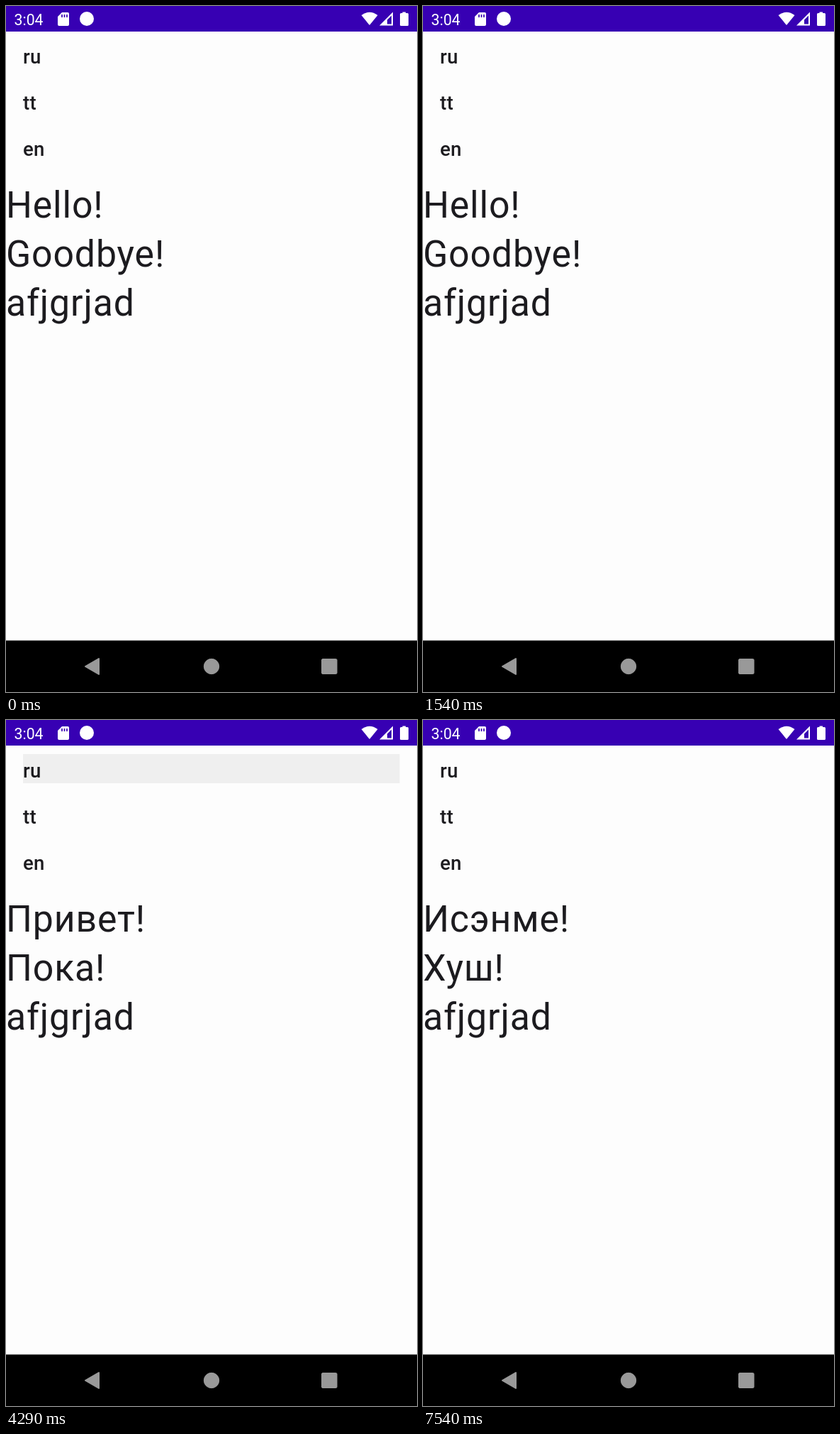
An HTML page that plays this animation: 580x966 px, repeating every 7.58 s.

```html
<!DOCTYPE html>
<html lang="en">
<head>
<meta charset="utf-8">
<style>
  html, body { margin: 0; width: 100%; height: 100%; overflow: hidden; background: #fdfdfd; }
  svg { display: block; font-family: Roboto, sans-serif; }
  .row { font-size: 27.6px; font-weight: 500; letter-spacing: .26px; fill: #1c1b1f; }
  .line { font-size: 51.75px; letter-spacing: .8625px; fill: #1c1b1f; }
</style>
</head>
<body>
<svg width="580" height="966" viewBox="0 0 580 966">
  <defs><clipPath id="bounds"><rect id="bound" x="24" width="531.5" height="41"/></clipPath></defs>
  <rect width="580" height="966" fill="#fdfdfd"/>

  <rect width="580" height="36" fill="#3700b3"/>
  <g fill="#fff">
    <text x="11.5" y="26.5" font-size="21.3">3:04</text>
    <path d="M79 9h8q2 0 2 2v15q0 2-2 2H75q-2 0-2-2V15z"/>
    <path d="M79 12v4M82.5 12v4M86 12v4" stroke="#3700b3" stroke-width="1.7"/>
    <circle cx="114" cy="18" r="10"/>
    <path d="M513 27L501.5 13Q513 4.500 524.500 13z"/>
    <path d="M546 8.500V27.500H527zM544 13.500L538 19.500V25.500H544z" fill-rule="evenodd"/>
    <path d="M559.500 10V8.500h4.500V10h2.500q1.500 0 1.500 1.500V26.500q0 1.500-1.500 1.500h-9q-1.500 0-1.500-1.500V11.500q0-1.500 1.500-1.500z"/>
  </g>

  <text class="row" x="24" y="81">ru</text>
  <text class="row" x="24" y="146">tt</text>
  <text class="row" x="24" y="211">en</text>
  <text class="line" id="greeting" x="0" y="298"></text>
  <text class="line" id="farewell" x="0" y="367"></text>
  <text class="line" x="0" y="436">afjgrjad</text>
  <g clip-path="url(#bounds)"><circle id="ripple"/></g>

  <rect y="893.5" width="580" height="73" fill="#000"/>
  <g fill="#999" stroke="#999" stroke-linejoin="round">
    <path d="M112 930L131 919V941z" stroke-width="2"/>
    <circle cx="290" cy="930" r="10.7"/>
    <rect x="445.500" y="919.500" width="21.500" height="21" rx="1.500"/>
  </g>
</svg>
<script>
const LOOP = 7580, EXPAND = 225, FADE_IN = 75, FADE_OUT = 150, TEXT_DELAY = 100;
const words = {
  en: ['Hello!', 'Goodbye!'],
  tt: ['Исэнме!', 'Хуш!'],
  ru: ['Привет!', 'Пока!']
};
const rowTop = { ru: 48, tt: 113, en: 178 };
const taps = [
  { lang: 'tt', start: 1935, hold: EXPAND },
  { lang: 'ru', start: 3685, hold: 520 },
  { lang: 'en', start: 4935, hold: EXPAND },
  { lang: 'tt', start: 6435, hold: EXPAND }
];
const [greeting, farewell, ripple, bound] =
  ['greeting', 'farewell', 'ripple', 'bound'].map(id => document.getElementById(id));
const clamp = v => Math.min(1, Math.max(0, v));
const mix = (a, b, k) => a + (b - a) * k;

// cubic-bezier(.4, 0, .2, 1)
function ease(x) {
  let lo = 0, hi = 1;
  for (let i = 0; i < 20; i++) {
    const s = (lo + hi) / 2, r = 1 - s;
    if (1.2 * r * r * s + .6 * r * s * s + s ** 3 < x) lo = s; else hi = s;
  }
  return 3 * lo * lo - 2 * lo ** 3;
}

function set(el, attrs) {
  for (const name in attrs) el.setAttribute(name, attrs[name]);
}

function drawRipple({ lang, start, hold }, time) {
  const age = time - start, grow = clamp(age / EXPAND), top = rowTop[lang];
  const alpha = .13 * clamp(age / FADE_IN) * (1 - clamp((age - hold) / FADE_OUT));
  set(bound, { y: top });
  set(ripple, {
    cx: mix(98, 289.5, grow), cy: top + 20.5,
    r: mix(159, 281, ease(grow)), 'fill-opacity': alpha
  });
}

function frame(now) {
  const time = now % LOOP;
  const shown = taps.filter(tap => time >= tap.start + TEXT_DELAY).pop();
  [greeting.textContent, farewell.textContent] = words[shown ? shown.lang : 'en'];
  drawRipple(taps.filter(tap => time >= tap.start).pop() || taps[0], time);
  requestAnimationFrame(frame);
}
frame(0);
</script>
</body>
</html>
```
